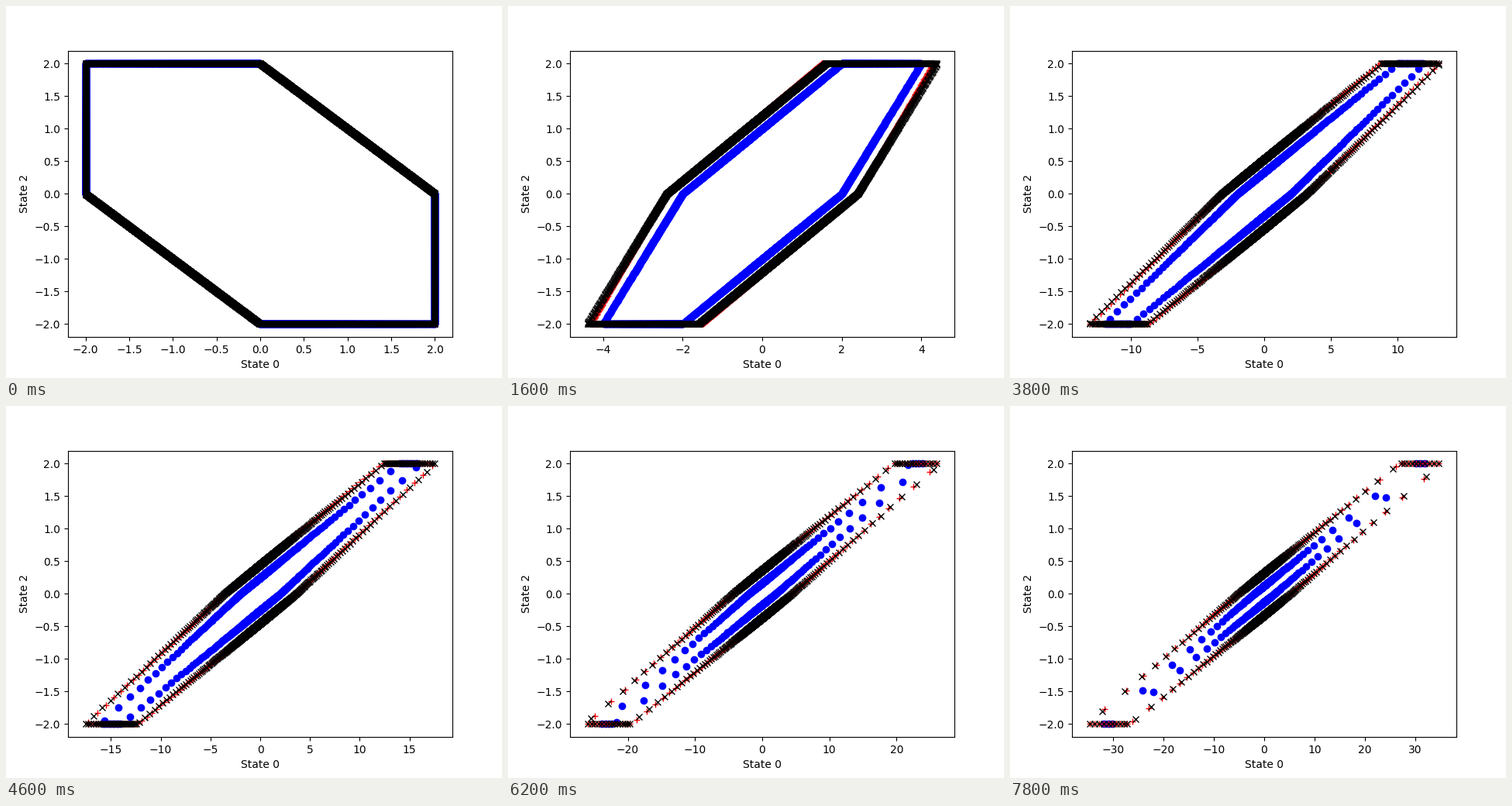
A matplotlib script for the animation above (8 s loop, 640 by 480 pixels).

```python
import numpy as np
import matplotlib.pyplot as plt
from matplotlib.animation import FuncAnimation

TICK = 100     # ms
DT = 0.5       # time covered by one step
GROWTH = 0.1   # widening of the outer sets per step
LAG = 0.05     # time lag of the red set

# The slideshow speeds up: 400 ms, then 300 ms, then 200 ms per step
holds = [4] * 4 + [3] * 6 + [2] * 23
schedule = np.repeat(np.arange(len(holds)), holds)

angles = np.radians(np.arange(3600) / 10)
c, s = np.cos(angles), np.sin(angles)


def boundary(t, width):
    """Points where evenly spaced rays leave the sheared hexagon."""
    gauge = np.max([np.abs(s) / 2,
                    np.abs(c - t * s) / width,
                    np.abs(c - (t - 1) * s) / width], axis=0)
    return c / gauge, s / gauge


fig, ax = plt.subplots(figsize=(6.4, 4.8), dpi=100)
ax.set_xlabel("State 0")
ax.set_ylabel("State 2")
inner, = ax.plot([], [], "bo")
middle, = ax.plot([], [], "r+")
outer, = ax.plot([], [], "kx")


def update(frame):
    step = schedule[frame]
    t = step * DT
    width = 2 + GROWTH * step
    lag = LAG if step else 0
    inner.set_data(*boundary(t, 2))
    middle.set_data(*boundary(t - lag, width))
    outer.set_data(*boundary(t, width))
    ax.relim()
    ax.autoscale_view()
    return inner, middle, outer


anim = FuncAnimation(fig, update, frames=len(schedule), interval=TICK,
                     init_func=lambda: update(0), repeat=True, repeat_delay=0)
plt.show()
```
